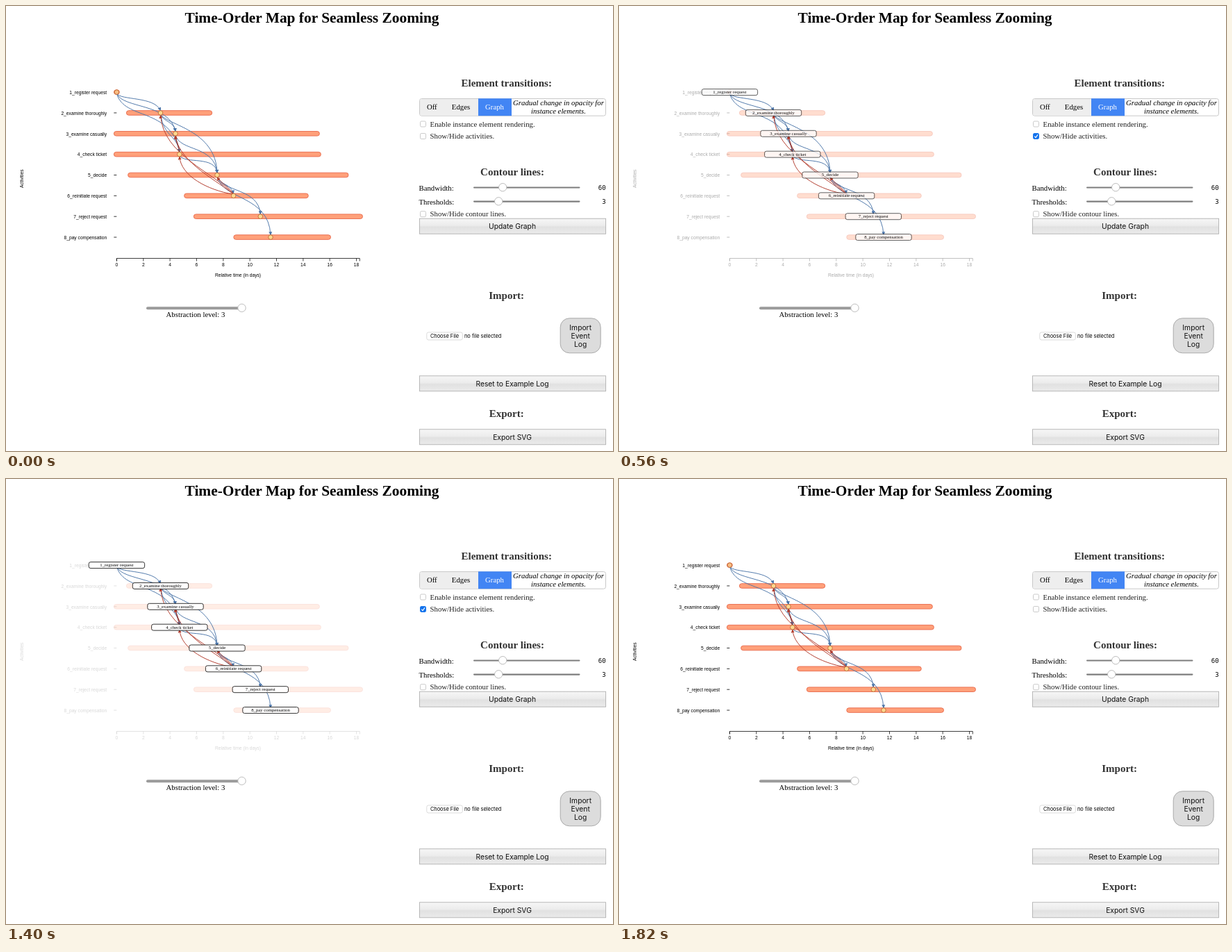
Animation of 874 by 641 pixels, one loop 2.03 s. Source, as an HTML page:

```html
<!DOCTYPE html>
<html lang="en">
<head>
<meta charset="utf-8">
<title>Time-Order Map</title>
<style>
  html, body { margin: 0; width: 100%; height: 100%; overflow: hidden; background: #fff; }
  svg { display: block; }
  text { white-space: pre; }
  .serif { font: 10.75px "Liberation Serif", "Times New Roman", serif; }
  .head { font: bold 15px "Liberation Serif", "Times New Roman", serif; fill: #333; }
  .title { font: bold 21.4px "Liberation Serif", "Times New Roman", serif; }
  .italic { font: italic 10.75px "Liberation Serif", "Times New Roman", serif; }
  .axis { font: 6.7px "Liberation Sans", Arial, sans-serif; }
  .tag { font: 6.75px "Liberation Serif", "Times New Roman", serif; }
  .button { font: 10.3px Inter, sans-serif; fill: #111; }
  .small { font: 7.4px Inter, sans-serif; }
  .mono { font: 9px "DejaVu Sans Mono", monospace; }
</style>
</head>
<body>
<svg id="stage" width="874" height="641" viewBox="0 0 874 641">
  <defs>
    <linearGradient id="face" x1="0" y1="0" x2="0" y2="1">
      <stop offset="0" stop-color="#f6f6f6"/>
      <stop offset=".45" stop-color="#ececec"/>
      <stop offset=".55" stop-color="#e1e1e1"/>
      <stop offset="1" stop-color="#ebebeb"/>
    </linearGradient>
  </defs>
</svg>
<script>
const NS = 'http://www.w3.org/2000/svg';
const stage = document.getElementById('stage');

function add(parent, tag, attrs = {}, content) {
  const el = document.createElementNS(NS, tag);
  for (const key in attrs) el.setAttribute(key, attrs[key]);
  if (content !== undefined) el.textContent = content;
  parent.appendChild(el);
  return el;
}
const group = () => add(stage, 'g');
const text = (parent, cls, x, y, str, anchor = 'start', more = {}) =>
  add(parent, 'text', { class: cls, x, y, 'text-anchor': anchor, ...more }, str);
const rect = (parent, x, y, width, height, rx, fill, stroke = 'none', sw = 1) =>
  add(parent, 'rect', { x, y, width, height, rx, fill, stroke, 'stroke-width': sw });
const circle = (parent, cx, cy, r, fill, stroke, sw = 1) =>
  add(parent, 'circle', { cx, cy, r, fill, stroke, 'stroke-width': sw });
const path = (parent, d, stroke, sw = 1) =>
  add(parent, 'path', { d, fill: 'none', stroke, 'stroke-width': sw });

// name, bar start, bar end, node x
const rows = [
  ['1_register request', 155.5, 163.3, 159.4],
  ['2_examine thoroughly', 173.4, 296.7, 222.5],
  ['3_examine casually', 155.4, 451.4, 244],
  ['4_check ticket', 155.4, 453.4, 249.8],
  ['5_decide', 175.6, 493, 304],
  ['6_reinitiate request', 256.6, 435.3, 327.6],
  ['7_reject request', 270.3, 513.5, 366.3],
  ['8_pay compensation', 327.8, 467.5, 381]
];
const rowY = i => 124.1 + 29.85 * i;

// from, to, first and second control point
const forward = [
  [1, 2, 165, 136, 214, 130], [1, 3, 168, 148, 236, 140], [1, 4, 170, 165, 237, 145],
  [2, 3, 228, 168, 242, 166], [2, 4, 228, 190, 246, 185], [2, 5, 232, 172, 302, 178],
  [3, 4, 245, 195, 249, 200], [3, 5, 250, 210, 300, 200], [4, 5, 258, 228, 301, 215],
  [5, 6, 308, 258, 324, 256], [5, 7, 310, 268, 364, 262], [5, 8, 312, 280, 378, 272]
];
const backward = [
  [4, 3, 249, 202, 245, 197], [6, 4, 290, 265, 252, 245],
  [6, 3, 310, 255, 248, 225], [6, 2, 300, 240, 226, 215], [6, 5, 323, 262, 310, 255]
];

const axis = group(), bars = group(), edges = group(), nodes = group();
const boxes = group(), tags = group(), panel = group();

function drawAxis() {
  rows.forEach(([name], i) => {
    const y = rowY(i);
    text(axis, 'axis', 145.2, y + 2.8, name, 'end');
    path(axis, `M155.3 ${y}h4`, '#000', .8);
  });
  path(axis, 'M159.4 367.5v-4H509.3v4', '#000', .75);
  for (let k = 0; k < 10; k++) {
    const x = 159.4 + 38.35 * k;
    path(axis, `M${x} 363.5v4`, '#000', .75);
    text(axis, 'axis', x, 374.5, 2 * k, 'middle');
  }
  text(axis, 'axis', 334, 389.6, 'Relative time (in days)', 'middle');
  text(axis, 'axis', 0, 0, 'Activities', 'middle', { transform: 'translate(25 248.7) rotate(-90)' });
}

function drawEdges(list, color, dir) {
  const id = 'tip' + (dir > 0 ? 'Down' : 'Up');
  const tip = add(stage.querySelector('defs'), 'marker', {
    id, viewBox: '0 0 10 10', refX: 9, refY: 5, orient: 'auto',
    markerUnits: 'userSpaceOnUse', markerWidth: 5, markerHeight: 5
  });
  add(tip, 'path', { d: 'M0 0L10 5L0 10z', fill: color });
  for (const [a, b, ...c] of list) {
    const x1 = rows[a - 1][3], x2 = rows[b - 1][3];
    const y1 = rowY(a - 1) + 2 * dir, y2 = rowY(b - 1) - 3.3 * dir;
    path(edges, `M${x1} ${y1}C${c[0]} ${c[1]} ${c[2]} ${c[3]} ${x2} ${y2}`, color, .95)
      .setAttribute('marker-end', `url(#${id})`);
  }
}

function drawRows() {
  rows.forEach(([name, x1, x2, x], i) => {
    const y = rowY(i);
    rect(bars, x1, y - 3.3, x2 - x1, 6.6, 3.3, '#ffa07a', '#e8694c', .9);
    circle(nodes, x, y, 3.3, i ? '#ffd890' : '#f8bd84', '#bd6a35', .9);
    rect(boxes, x - 40.2, y - 4.5, 80.4, 9, 2.7, '#fff', '#111', .9);
    text(tags, 'tag', x, y + 1.9, name, 'middle');
  });
}

function checkbox(y, label) {
  const box = rect(panel, 596.5, y - 4, 8, 8, 1.7, '#fff', '#c4c4c4', .9);
  text(panel, 'serif', 610.6, y + 3.7, label, 'start', { fill: '#222' });
  return box;
}
function slider(x1, x2, y, thumb, h, color, r) {
  rect(panel, x1, y - h / 2, x2 - x1, h, h / 2, color);
  circle(panel, thumb, y - .3, r, '#fff', '#b5b5b5', .9);
}
function button(y, label) {
  rect(panel, 595.4, y + .5, 268.2, 22, 0, 'url(#face)', '#b0b0b0', .9);
  text(panel, 'button', 729, y + 15.2, label, 'middle');
}

function drawPanel() {
  text(panel, 'title', 440.5, 23.6, 'Time-Order Map for Seamless Zooming', 'middle');
  text(panel, 'head', 720.7, 115.7, 'Element transitions:', 'middle');
  text(panel, 'head', 729, 244, 'Contour lines:', 'middle');
  text(panel, 'head', 720.7, 421.5, 'Import:', 'middle');
  text(panel, 'head', 720.7, 592, 'Export:', 'middle');

  rect(panel, 595.5, 133.5, 268, 24.7, 3, '#fff', '#c2c2c2', .9);
  path(panel, 'M680 134H598.5q-2.5 0 -2.5 2.5V155.2q0 2.5 2.5 2.5H680z', 'none').setAttribute('fill', '#eee');
  rect(panel, 680, 133.2, 48, 25, 0, '#4285f4');
  text(panel, 'serif', 613.3, 148.7, 'Off', 'middle');
  text(panel, 'serif', 655, 148.7, 'Edges', 'middle');
  text(panel, 'serif', 703.5, 148.7, 'Graph', 'middle', { fill: '#fff' });
  text(panel, 'italic', 795.5, 143.3, 'Gradual change in opacity for', 'middle');
  text(panel, 'italic', 795.5, 155.4, 'instance elements.', 'middle');

  checkbox(170, 'Enable instance element rendering.');
  const toggle = checkbox(187.5, 'Show/Hide activities.');
  const tick = path(panel, 'M598.3 187.7l1.7 1.9l3 -4.2', '#fff', 1.2);
  checkbox(299.7, 'Show/Hide contour lines.');

  text(panel, 'serif', 594.5, 265.5, 'Bandwidth:');
  text(panel, 'serif', 594.5, 285.7, 'Thresholds:');
  text(panel, 'mono', 863.6, 264.8, '60', 'end');
  text(panel, 'mono', 863.6, 285, '3', 'end');
  slider(673, 826.5, 261.5, 715.2, 2.2, '#7d7d7d', 5.7);
  slider(673, 826.5, 281.6, 709.2, 2.2, '#7d7d7d', 5.7);
  slider(202, 345, 435.2, 339.5, 4, '#9b9b9b', 5.7);
  text(panel, 'serif', 273, 448.3, 'Abstraction level: 3', 'middle');

  button(305.7, 'Update Graph');
  button(532.3, 'Reset to Example Log');
  button(609.3, 'Export SVG');

  rect(panel, 605.8, 470, 51.5, 11, 2.5, '#fff', '#d2d2d2', .8);
  text(panel, 'small', 631.5, 478.2, 'Choose File', 'middle');
  text(panel, 'small', 660, 478.2, 'no file selected');
  rect(panel, 798.2, 449.8, 58, 50, 13, '#dcdcdc', '#a3a3a3', .9);
  ['Import', 'Event', 'Log'].forEach((word, i) =>
    text(panel, 'button', 827.2, 467 + 12.1 * i, word, 'middle'));
  return { toggle, tick };
}

drawAxis();
drawEdges(forward, '#4a74a8', 1);
drawEdges(backward, '#b23a2c', -1);
drawRows();
const { toggle, tick } = drawPanel();

const LOOP = 2030, STEP = 70;
const fade = [0, 0, .005, .07, .27, .75, .95, 1];

// The toggle plays in from 280 ms and back out from 1400 ms.
function levelAt(t) {
  if (t < 280) return 0;
  if (t < 1400) return Math.min(7, 1 + Math.floor((t - 280) / STEP));
  return Math.max(0, 6 - Math.floor((t - 1400) / STEP));
}

function render(t) {
  const level = levelAt(t), f = fade[level], on = level > 0;
  axis.setAttribute('opacity', 1 - .89 * f);
  bars.setAttribute('opacity', 1 - .85 * f);
  nodes.setAttribute('opacity', level < 2 ? 1 : 0);
  boxes.setAttribute('opacity', f);
  tags.setAttribute('opacity', f && Math.pow(f, .12));
  toggle.setAttribute('fill', on ? '#1272ec' : '#fff');
  toggle.setAttribute('stroke', on ? '#1272ec' : '#c4c4c4');
  tick.setAttribute('opacity', on ? 1 : 0);
}

const start = performance.now();
function frame(now) {
  render(Math.max(0, now - start) % LOOP);
  requestAnimationFrame(frame);
}
render(0);
requestAnimationFrame(frame);
</script>
</body>
</html>
```
